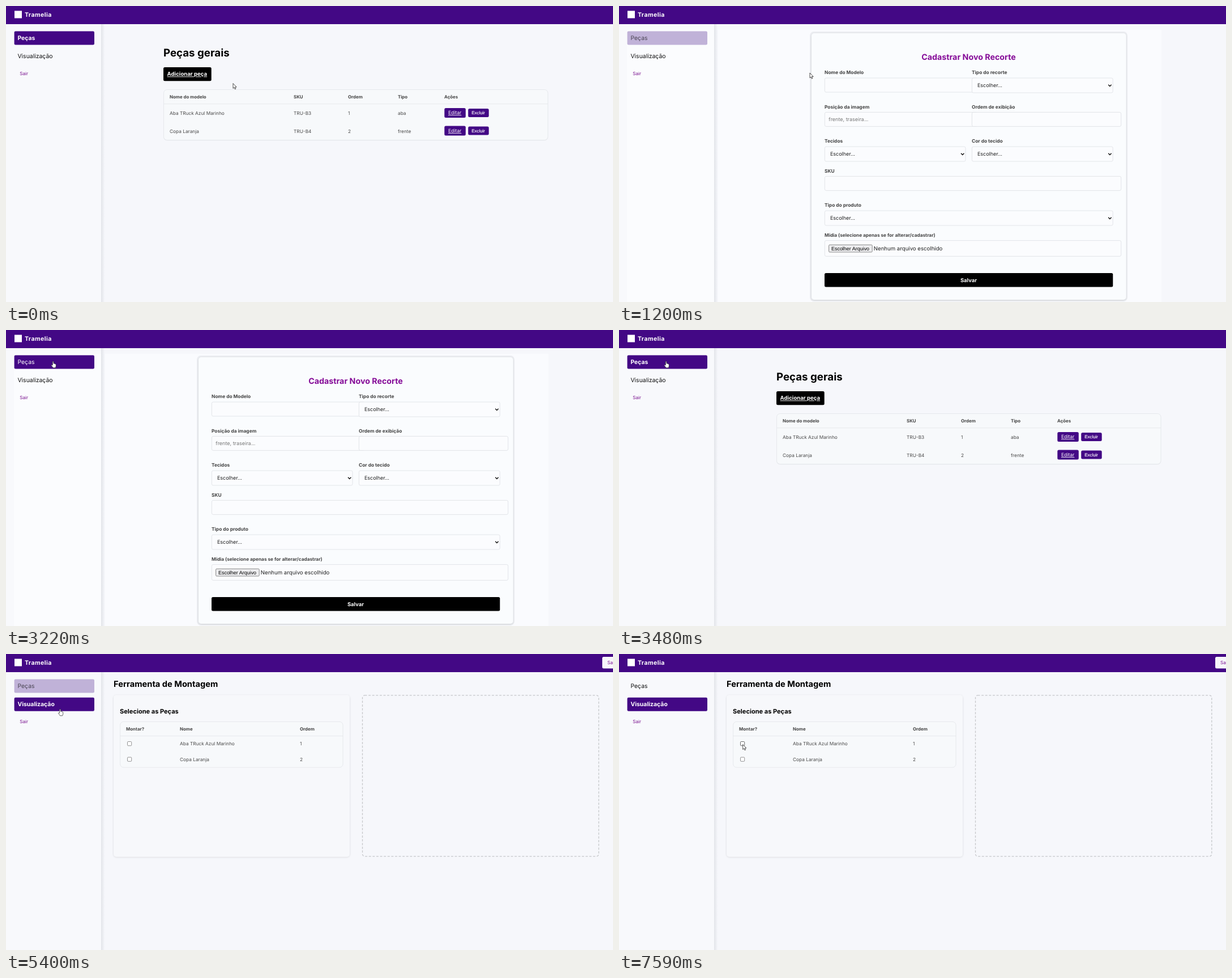
An HTML page that plays this animation: 1072 px wide and 522 px high, repeating every 8000 ms.

```html
<!DOCTYPE html>
<html lang="pt">
<head>
<meta charset="utf-8">
<title>Peças</title>
<style>
html, body { margin: 0; width: 100%; height: 100%; overflow: hidden; background: #f6f7fb; }
svg { display: block; width: 1072px; height: 522px; }
text { font-family: Inter, "Open Sans", sans-serif; text-rendering: geometricPrecision; white-space: pre; }
.b { font-weight: 700; }
.sys { font-family: "Liberation Sans", Arial, sans-serif; }
.u { text-decoration: underline; }
</style>
</head>
<body>
<svg id="stage" viewBox="0 0 1072 522" xmlns="http://www.w3.org/2000/svg"></svg>
<script>
const PURPLE = '#430885', LOOP = 8000;

// --- drawing helpers ---
const rect = (x, y, w, h, fill, r = 0, extra = '') =>
  `<rect x="${x}" y="${y}" width="${w}" height="${h}" rx="${r}" fill="${fill}" ${extra}/>`;
const text = (x, y, size, str, fill = '#444', cls = '', extra = '') =>
  `<text x="${x}" y="${y}" font-size="${size}" fill="${fill}" class="${cls}" ${extra}>${str}</text>`;
const outline = (color, w = 0.8) => `stroke="${color}" stroke-width="${w}"`;
const group = (id, body) => `<g id="${id}">${body}</g>`;

const head = (x, y, str) => text(x, y, 7.85, str, '#444', 'b');
const cell = (x, y, str) => text(x, y, 8.3, str, '#4a4a4a');
const label = (x, y, str) => text(x, y, 8.4, str, '#444', 'b');
const field = (x, y, w, h = 25) => rect(x, y, w, h, '#fbfcfe', 2.5, outline('#dcdfe4'));
const select = (x, y, w) => field(x, y, w, 26) + text(x + 9.5, y + 16.3, 9, 'Escolher...', '#222') +
  `<path d="M${x + w - 8} ${y + 11.7}l2.7 2.7l2.7 -2.7" fill="none" ${outline('#111', 1.4)}/>`;
const card = (x, y, w, h, fill) => rect(x, y, w, h, fill, 5, 'filter="url(#soft)"');
const table = (x, y, w, h) =>
  rect(x, y, w, h, '#f7f9fb', 6, outline('#e3e5e9')) +
  `<path d="M${x} ${y + 25.2}h${w}" ${outline('#e3e5e9')}/>`;

// --- views ---
const pieces = [['Aba TRuck Azul Marinho', 'TRU-B3', 'aba'], ['Copa Laranja', 'TRU-B4', 'frente']];

const listView = () => {
  const cols = [289, 508, 604, 692, 774];
  const heads = ['Nome do modelo', 'SKU', 'Ordem', 'Tipo', 'Ações'];
  const row = ([name, sku, type], i) => {
    const y = 191.8 + 31.7 * i;
    return [name, sku, i + 1, type].map((s, c) => cell(cols[c], y, s)).join('') +
      rect(774.3, y - 11.9, 37.5, 17, PURPLE, 2.5) +
      text(780.9, y - 0.5, 8.6, 'Editar', '#fff', 'u') +
      rect(816.2, y - 10.9, 36.5, 15, PURPLE, 2.5) +
      text(822.3, y - 0.5, 7.9, 'Excluir', '#fff', 'sys', outline('#fff', 0.15));
  };
  return text(278, 89, 18.7, 'Peças gerais', '#000', 'b') +
    rect(278, 108, 84.7, 24.2, '#000', 2.5, 'id="add"') +
    text(284.6, 123.3, 9.6, 'Adicionar peça', '#fff', 'b u') +
    rect(278.5, 148.2, 678.5, 89, '#e3e5e9', 6) +
    table(278.5, 147.5, 678.5, 89) +
    heads.map((s, c) => head(cols[c], 163, s)).join('') + pieces.map(row).join('');
};

const formView = () =>
  rect(14, 42, 154, 480, '#fbfcfe') + rect(174, 42, 784, 480, '#fafbfe') +
  rect(337, 45, 561, 476, '#eceef2', 7) + card(340, 48, 555.5, 470, '#fafcfe') +
  text(617.5, 95, 14.25, 'Cadastrar Novo Recorte', '#850c98', 'b', 'text-anchor="middle"') +
  label(363, 120.2, 'Nome do Modelo') + field(363.4, 127, 270) +
  label(623, 120.2, 'Tipo do recorte') + select(623.4, 127, 248.8) +
  label(363, 180.8, 'Posição da imagem') + field(363.4, 187.4, 270) +
  text(370.3, 203.3, 9, 'frente, traseira...', '#777') +
  label(623, 180.8, 'Ordem de exibição') + field(623.4, 187.4, 263.3) +
  label(363, 241.2, 'Tecidos') + select(363.4, 248, 248.6) +
  label(623, 241.2, 'Cor do tecido') + select(623.4, 248, 248.8) +
  label(363, 294, 'SKU') + field(363.4, 300.4, 523.3) +
  label(363, 354.3, 'Tipo do produto') + select(363.4, 361, 508.8) +
  text(363, 407.1, 8.25, 'Mídia (selecione apenas se for alterar/cadastrar)', '#444', 'b') +
  field(363.4, 413.6, 523.3, 27.8) +
  rect(370.6, 421.2, 76.6, 12.8, '#ededef', 1.5, outline('#6c6c6c')) +
  text(375, 430.8, 8.95, 'Escolher Arquivo', '#000', 'sys') +
  text(449.8, 430.8, 9.65, 'Nenhum arquivo escolhido', '#222') +
  rect(363, 471, 509.3, 24.4, '#000', 2.5) +
  text(617.5, 486.5, 9.4, 'Salvar', '#fff', 'b', 'text-anchor="middle"');

const buildView = () => {
  const row = ([name], i) => {
    const y = 161 + 27.6 * i;
    return rect(214.5, y - 6.5, 7.2, 7.2, '#fff', 1.2, outline('#777') + ` id="check${i}"`) +
      cell(307, y, name) + cell(519, y, i + 1);
  };
  return rect(1053, 5, 40, 20.5, '#f7f5fb', 2.5) + text(1062, 18.2, 8.2, 'Sair', '#7b1490') +
    text(190, 58, 14.65, 'Ferramenta de Montagem', '#000', 'b') +
    card(190, 72.5, 417, 285, '#f7f8fb') +
    text(201, 104.8, 11.05, 'Selecione as Peças', '#000', 'b') +
    table(201.6, 119.4, 393.4, 80.6) +
    head(212, 135, 'Montar?') + head(307, 135, 'Nome') + head(519, 135, 'Ordem') +
    pieces.map(row).join('') +
    rect(629.5, 72.8, 417.3, 284, 'none', 4, outline('#c6c7cb', 1.3) + ' stroke-dasharray="4 2.6"');
};

const item = (id, y, str) => group(id, rect(14.6, y, 141.4, 24, '#000', 2.2) + text(20.4, y + 15.6, 10.45, str));

const cursors = {
  arrow: `<path d="M.5 .5V9.3L2.5 7.5L3.9 10.7L5.4 10L4 7H6.7Z" fill="#fff" ${outline('#222')} stroke-linejoin="round"/>`,
  hand: `<path d="M3 7.4V1.4Q3 .5 3.8 .5Q4.7 .5 4.7 1.4V4.3Q6.2 3.8 6.4 4.8Q7.6 4.4 7.8 5.4Q9 5.2 9 6.3V9Q8.6 10.5 8 12H3.8Q2.6 10 .7 7.7Q.7 6.2 3 7.4Z" fill="#fff" ${outline('#222', 0.7)} stroke-linejoin="round"/>`,
  beam: `<path d="M.6 .5H2L2.6 1L3.2 .5H4.6M2.6 1V12.4M.6 13H2L2.6 12.4L3.2 13H4.6" fill="none" ${outline('#222')}/>`
};

document.getElementById('stage').innerHTML =
  `<defs><filter id="soft" x="-5%" y="-5%" width="110%" height="110%">
    <feDropShadow dx="0" dy="0.7" stdDeviation="1.6" flood-color="#000" flood-opacity=".14"/></filter>
  <linearGradient id="edge"><stop stop-color="#e2e4e9"/><stop offset="1" stop-color="#f6f7fb"/></linearGradient></defs>` +
  rect(0, 0, 1072, 522, '#f6f7fb') + rect(0, 32, 168, 490, '#f8f9fc') +
  rect(0, 0, 1072, 32, PURPLE) + rect(15, 8.5, 13, 13, '#fff') +
  text(33, 19, 10.6, 'Tramelia', '#fff', 'b', 'letter-spacing=".4"') +
  group('list', listView()) + group('form', formView()) + group('build', buildView()) +
  rect(168, 32, 6.5, 490, 'url(#edge)') +
  item('parts', 44.5, 'Peças') + item('preview', 76.8, 'Visualização') +
  text(24.2, 122.3, 8.2, 'Sair', '#7b1490') +
  group('pointer', Object.keys(cursors).map(k => group(k, cursors[k])).join(''));

// --- timeline: each track holds its value until the next step ---
const looks = {
  off: ['none', '#111', 400],
  faint: ['#c0b2d8', '#4a4553', 400],
  mid: ['#8259ae', '#d8cfe4', 400],
  hover: [PURPLE, '#fff', 400],
  on: [PURPLE, '#fff', 700]
};
const tracks = {
  view: [[0, 'list'], [1200, 'form'], [3480, 'list'], [5400, 'build']],
  parts: [[0, 'on'], [1200, 'faint'], [1330, 'off'], [2960, 'faint'], [3090, 'mid'], [3220, 'hover'],
    [3480, 'on'], [5400, 'faint'], [5530, 'off']],
  preview: [[0, 'off'], [4250, 'mid'], [4380, 'hover'], [5400, 'on']],
  add: [[0, '#000'], [270, '#1c1c1c'], [400, '#333'], [1200, '#000']],
  check: [[0, '#777'], [7460, '#444']],
  pointer: [
    [0, 'arrow', 400.5, 136], [120, 'arrow', 367, 120.5], [270, 'hand', 338, 118], [400, 'hand', 333.5, 118],
    [1050, 'arrow', 336.5, 117.5], [1720, 'arrow', 359, 121.5], [1870, 'beam', 503, 129],
    [2020, 'beam', 520, 195], [2150, 'beam', 668, 192], [2280, 'arrow', 870, 150], [2410, 'arrow', 523, 120],
    [2530, 'arrow', 333, 105], [2660, 'arrow', 269, 54], [2810, 'arrow', 171, 43.5],
    [2960, 'hand', 118, 52], [3090, 'hand', 90, 54], [3220, 'hand', 79.3, 54.7],
    [4120, 'arrow', 87, 71], [4250, 'hand', 90, 90], [4380, 'hand', 91.7, 96.8],
    [6160, 'arrow', 105, 103.3], [6280, 'arrow', 117, 111], [6410, 'arrow', 138, 124],
    [6540, 'arrow', 162, 139], [6660, 'arrow', 182, 151], [6770, 'arrow', 194, 158],
    [6920, 'arrow', 288, 161], [7050, 'arrow', 391, 161.5], [7180, 'arrow', 292, 161],
    [7310, 'arrow', 217, 158.5], [7460, 'arrow', 218.2, 159]
  ]
};

const $ = id => document.getElementById(id);
const at = (name, t) => tracks[name].findLast(step => step[0] <= t).slice(1);
const show = (ids, active) => ids.forEach(id => $(id).setAttribute('display', id === active ? 'inline' : 'none'));

function paint(t) {
  show(['list', 'form', 'build'], at('view', t)[0]);
  for (const id of ['parts', 'preview']) {
    const [bg, ink, weight] = looks[at(id, t)[0]];
    const [box, word] = $(id).children;
    box.setAttribute('fill', bg);
    word.setAttribute('fill', ink);
    word.setAttribute('font-weight', weight);
  }
  $('add').setAttribute('fill', at('add', t)[0]);
  $('check0').setAttribute('stroke', at('check', t)[0]);
  const [shape, x, y] = at('pointer', t);
  show(Object.keys(cursors), shape);
  $('pointer').setAttribute('transform', `translate(${x} ${y})`);
}

const start = performance.now();
function tick() {
  paint((performance.now() - start) % LOOP);
  requestAnimationFrame(tick);
}
tick();
</script>
</body>
</html>
```
